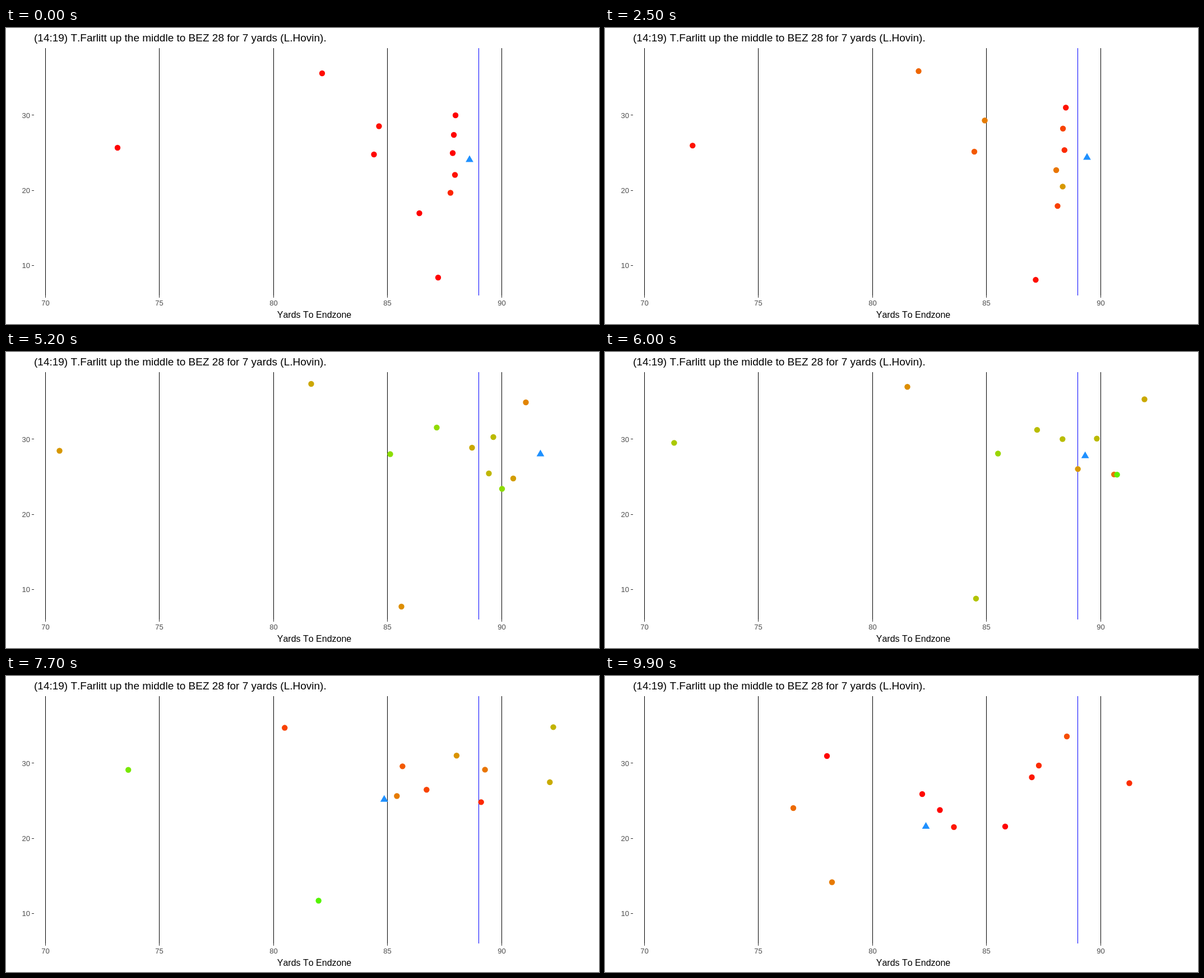
Recreate the animation shown at these times as an HTML page. Size 1058 by 529 pixels, loop 10 s.

```html
<!DOCTYPE html>
<html lang="en">
<head>
<meta charset="utf-8">
<title>Run play</title>
<style>
  html, body { margin: 0; height: 100%; overflow: hidden; background: #fff; }
  svg { display: block; width: 100%; height: 100%; }
  line { shape-rendering: crispEdges; }
  text { font-family: "Liberation Sans", Arial, sans-serif; font-kerning: none; }
  .axis { font-size: 13px; fill: #4d4d4d; }
</style>
</head>
<body>
<svg id="stage" viewBox="0 0 1058 529">
  <text x="50" y="24" font-size="19">(14:19) T.Farlitt up the middle to BEZ 28 for 7 yards (L.Hovin).</text>
  <text x="550" y="518" font-size="16" text-anchor="middle">Yards To Endzone</text>
</svg>
<script>
const LOOP = 10000, STEP = 100;
const SNAP = 1300, EARLY = 600;   // when the ball is snapped, and when men in motion set off
const BURST = 2200;               // how long a burst of effort lasts
const stage = document.getElementById("stage");
const moves = [];

function add(tag, attrs, text = "") {
  const el = document.createElementNS("http://www.w3.org/2000/svg", tag);
  for (const name in attrs) el.setAttribute(name, attrs[name]);
  el.textContent = text;
  return stage.appendChild(el);
}

const line = (x1, y1, x2, y2, stroke) => add("line", { x1, y1, x2, y2, stroke });
const yardX = yard => Math.floor(70.5 + (yard - 70) * 40.68) + .5;

for (let yard = 70; yard <= 90; yard += 5) {
  const x = yardX(yard);
  line(x, 36, x, 478, "#000");
  line(x, 478, x, 482, "#333");
  add("text", { x, y: 496, class: "axis", "text-anchor": "middle" }, yard);
}
for (let side = 10; side <= 30; side += 10) {
  const y = 558.8 - side * 13.43;
  line(46, y, 50, y, "#333");
  add("text", { x: 43, y: y + 4.6, class: "axis", "text-anchor": "end" }, side);
}
line(yardX(89), 36, yardX(89), 478, "#00f");

// Smooth curve through a few timed values, starting from rest
function curve(times, values) {
  const last = times.length - 1;
  const rate = i => (values[i + 1] - values[i]) / (times[i + 1] - times[i]);
  const slopes = times.map((time, i) => {
    if (i === 0) return 0;
    if (i === last) return rate(i - 1);
    const before = time - times[i - 1], after = times[i + 1] - time;
    return (rate(i - 1) * after + rate(i) * before) / (before + after);
  });
  return t => {
    t = Math.max(t, times[0]);
    let i = 0;
    while (i < last - 1 && t >= times[i + 1]) i++;
    const span = times[i + 1] - times[i];
    const u = (t - times[i]) / span, v = 1 - u;
    return values[i] * v * v * (1 + 2 * u) + values[i + 1] * u * u * (3 - 2 * u)
      + span * u * v * (slopes[i] * v - slopes[i + 1] * u);
  };
}

function run(el, times, xs, ys) {
  const x = curve(times, xs), y = curve(times, ys);
  moves.push(t => el.setAttribute("transform", `translate(${x(t)} ${y(t)})`));
}

// A dot turns from red to green and back around its time of highest effort
function defender(peak, peakTime, xs, ys, start = SNAP) {
  const dot = add("circle", { r: 5.2 });
  run(dot, [start, 3700, 5200, 6800, 8700, 9900], xs, ys);
  moves.push(t => {
    const effort = peak * Math.exp(-(((t - peakTime) / BURST) ** 2));
    dot.style.fill = `color-mix(in lab, #f00, #0f0 ${(100 * effort).toFixed(2)}%)`;
  });
}

// Secondary
defender(.9, 7200, [199, 121.5, 95.5, 166.5, 277, 336], [214, 200, 176.5, 155, 195.5, 236], EARLY);
defender(.5, 4700, [564, 552, 544.5, 528, 452.5, 396], [81, 69, 57, 73.5, 117, 143]);
defender(.95, 7400, [771, 752.5, 705.5, 612, 493, 405], [446, 455, 455, 422, 381.5, 368.5]);
// Linebackers
defender(.8, 4800, [665.5, 708.5, 768.5, 754, 640.5, 566], [175.5, 149, 135, 148.5, 180.5, 211]);
defender(.8, 5400, [656.5, 667, 685.5, 710.5, 667.5, 622.5], [226, 208, 182.5, 189.5, 246.5, 270]);
// Front
defender(.6, 7000, [802, 864, 927.5, 984.5, 931.5, 824], [156, 118, 90, 84.5, 101.5, 108]);
defender(.6, 5600, [799, 845.5, 869.5, 876.5, 816, 761.5], [191, 163, 152, 160.5, 175, 181]);
defender(.6, 6200, [797, 844, 831.5, 802.5, 803.5, 774], [223.5, 203, 171, 144.5, 147.5, 160]);
defender(.6, 4600, [801, 821, 861.5, 807, 678, 597.5], [262.5, 238, 217, 204.5, 211, 239.5]);
defender(.6, 3900, [793, 858, 905, 894, 782, 714], [294.5, 260.5, 226, 218.5, 241, 269]);
defender(.9, 6000, [737.5, 859, 885, 943, 979.5, 935.5], [331, 294, 244.5, 199, 188.5, 191.5], EARLY);

// Ball carrier
run(add("path", { d: "M0-8L6.9 4H-6.9Z", fill: "#1e90ff" }),
  [SNAP, 2500, 3700, 4400, 5200, 6800, 8700, 9900],
  [827, 860, 985, 1003, 953.5, 752.5, 614.5, 572.5],
  [235.5, 231.5, 209.5, 196, 182.5, 199, 247, 269]);

function draw(now) {
  const t = Math.floor(now % LOOP / STEP) * STEP;
  for (const move of moves) move(t);
  requestAnimationFrame(draw);
}
draw(0);
</script>
</body>
</html>
```
